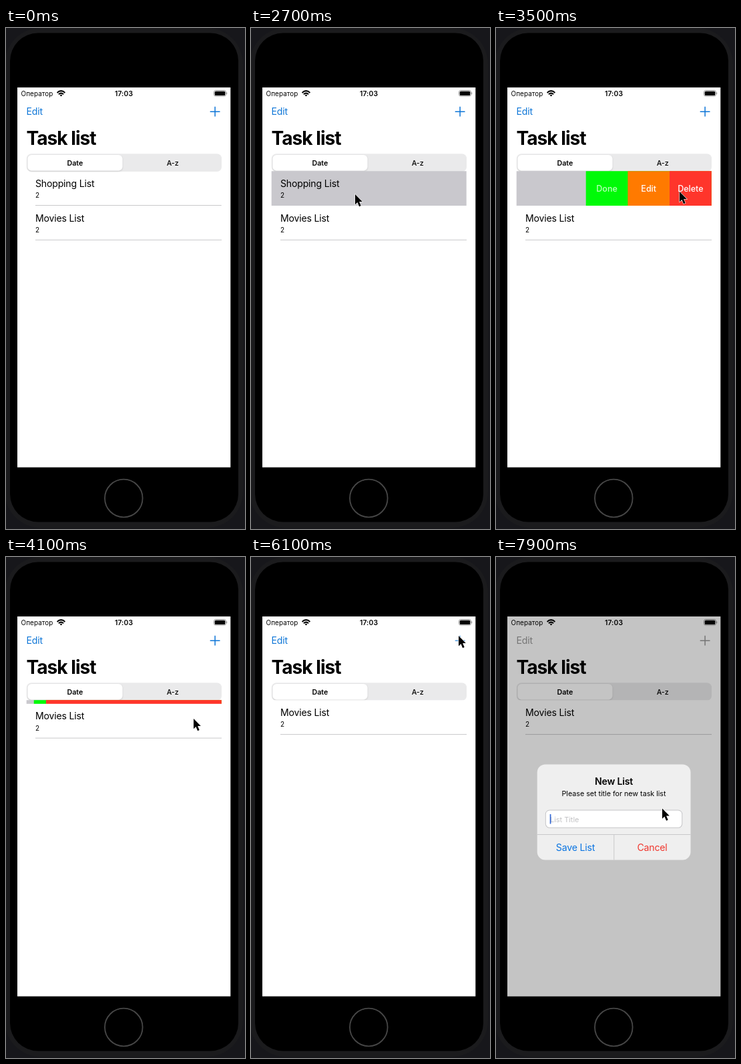
Recreate the animation shown at these times as an HTML page. Size 358 by 750 pixels, loop 8 s.

```html
<!DOCTYPE html>
<html lang="en">
<meta charset="utf-8">
<title>Task list</title>
<style>
  html, body { margin: 0; width: 100%; height: 100%; overflow: hidden; background: #17171b }
  svg { display: block; width: 358px; height: 750px; font-family: Inter, sans-serif }
  .mid { text-anchor: middle }
  .body { font-size: 14.1px; letter-spacing: -.014em }
  .note { font-size: 10px }
  .bar { font-size: 9.9px; letter-spacing: .01em }
  .bold { font-weight: 600 }
  .seg { font-size: 10.7px; font-weight: 600 }
  .act { font-size: 12.5px; font-weight: 500; fill: #fff }
  .line { stroke: #c8c8ca; stroke-width: 1 }
</style>
<svg viewBox="0 0 358 750">
  <defs>
    <clipPath id="rowClip"><rect x="30.7" y="214.3" width="292" height="51.7"/></clipPath>
    <filter id="soft" x="-10%" y="-30%" width="120%" height="170%">
      <feDropShadow dx="0" dy="1" stdDeviation="1.2" flood-opacity=".18"/>
    </filter>
  </defs>

  <!-- phone -->
  <rect x="-2" y="0" width="357" height="748" rx="54" fill="#1b1b1d"/>
  <rect x="6" y="7.5" width="342" height="732" rx="42"/>
  <circle cx="176.3" cy="704" r="28.3" fill="none" stroke="#474747" stroke-width="1.8"/>
  <rect x="17" y="89" width="319.3" height="568.7" fill="#fff"/>

  <!-- status bar -->
  <text class="bar" x="22.5" y="101.5">Оператор</text>
  <text class="bar bold mid" x="176.5" y="101.5" style="font-size:10.3px">17:03</text>
  <g fill="none" stroke="#000" stroke-width="2">
    <path d="M76.6 96.9Q82.5 91.4 88.4 96.9M78.9 99.3Q82.5 96 86.1 99.3"/>
    <path d="M82.5 102.6L80.6 100.6Q82.5 99 84.4 100.6Z" fill="#000" stroke="none"/>
  </g>
  <rect x="311.5" y="93.5" width="18" height="8.6" rx="2.6" fill="none" stroke="#999"/>
  <rect x="312.7" y="94.7" width="15.6" height="6.2" rx="1.5"/>
  <path d="M330.8 96.3v3" stroke="#999"/>

  <!-- header -->
  <text id="edit" class="body" x="30.5" y="130">Edit</text>
  <path id="plus" d="M305.7 125.2h14.8M313.1 117.8v14.8" stroke-width="1.5"/>
  <text x="30.5" y="175" style="font-size:28.2px;font-weight:700;letter-spacing:-.036em">Task list</text>
  <rect x="31" y="188.3" width="292" height="26.7" rx="7" fill="#eaeaeb"/>
  <rect x="32.4" y="190" width="142" height="23.6" rx="6" fill="#fff" filter="url(#soft)"/>
  <text class="seg mid" x="103.4" y="205.6">Date</text>
  <text class="seg mid" x="249.7" y="205.6" style="font-weight:500">A-z</text>

  <!-- first row with swipe actions -->
  <g id="row1" clip-path="url(#rowClip)">
    <rect id="lit" x="30" y="214" width="294" height="53" fill="#c9c8cd"/>
    <path id="rule" class="line" d="M44 265.5H323"/>
    <g id="content">
      <text class="body" x="44" y="238">Shopping List</text>
      <text class="note" x="44" y="254.3">2</text>
    </g>
    <g class="act mid" id="actions">
      <g><rect y="214" width="300" height="53" fill="#00fa08"/><text y="244.7" opacity=".75">Done</text></g>
      <g><rect y="214" width="300" height="53" fill="#ff7a00"/><text y="244.7">Edit</text></g>
      <g><rect y="214" width="300" height="53" fill="#ff352b"/><text y="244.7">Delete</text></g>
    </g>
  </g>

  <g id="row2">
    <rect x="30" y="266" width="294" height="53" fill="#fff"/>
    <text class="body" x="44" y="289.6">Movies List</text>
    <text class="note" x="44" y="306">2</text>
    <path class="line" d="M44 317.3H323"/>
  </g>

  <rect id="dim" x="17" y="89" width="319.3" height="568.7"/>

  <g id="alert">
    <rect x="61.7" y="310.5" width="229.8" height="143" rx="12" fill="#efefef"/>
    <text class="body bold mid" x="176.5" y="341.3">New List</text>
    <text class="mid" x="176.5" y="358.3" font-size="10.7">Please set title for new task list</text>
    <rect x="74.3" y="379" width="204.5" height="26.3" rx="6" fill="#fff" stroke="#c6c6c8" id="field"/>
    <text x="81" y="396.7" font-size="10.9" fill="#c2c2c4">List Title</text>
    <path class="line" d="M61.7 415.5H291.5M176.8 415.5V453.5"/>
    <text class="body mid" x="119" y="440" fill="#0a74e2">Save List</text>
    <text class="body mid" x="234" y="440" fill="#f0362d">Cancel</text>
    <rect id="caret" x="80.7" y="385" width="1.7" height="14.5" fill="#3569d6"/>
  </g>

  <path id="cursor" d="M0 0V15.2L3.4 12L6.1 18.2L8.7 17L6.1 11H10.8Z" stroke="#fff" stroke-width="1.1" paint-order="stroke"/>
</svg>
<script>
  const LOOP = 8000, STEP = 100, LEFT = 30.7, RIGHT = 322.7, ROW = 51.7;
  const $ = id => document.getElementById(id);
  const set = (el, attrs) => { for (const k in attrs) el.setAttribute(k, attrs[k]); };
  const show = (el, on) => set(el, { visibility: on ? 'visible' : 'hidden' });
  const clamp = v => Math.min(1, Math.max(0, v));
  const ease = v => v * v * (3 - 2 * v);
  const mix = (a, b, v) => a + (b - a) * v;

  // pointer stops: time, x, y
  const stops = [
    [100, 258, 296], [300, 115, 180], [500, 115, 180], [700, 82, 200], [1100, 243, 247],
    [1400, 243, 247], [1700, 252, 248], [1800, 252, 248], [2300, 156, 249], [2700, 156, 249],
    [3000, 50, 254], [3100, 50, 254], [3400, 275, 247], [3500, 275, 245], [3700, 281, 242],
    [4100, 281, 242], [4400, 283, 211], [5000, 309, 117], [5200, 309, 117], [5400, 311, 118],
    [7100, 311, 118], [7700, 247, 371], [7800, 247, 371], [7900, 249, 376.5]
  ];

  function pointer(t) {
    const i = stops.findIndex(s => s[0] > t);
    if (i < 0) return stops[stops.length - 1].slice(1);
    if (i === 0) return stops[0].slice(1);
    const a = stops[i - 1], b = stops[i], v = ease((t - a[0]) / (b[0] - a[0]));
    return [mix(a[1], b[1], v), mix(a[2], b[2], v)];
  }

  // critically damped spring, 0 to 1
  function spring(ms, rate) {
    const k = Math.max(0, ms) * rate;
    return 1 - (1 + k) * Math.exp(-k);
  }

  function drawRows(t) {
    const swipe = 188 * ease(clamp((t - 2700) / 400));
    const gone = t >= 4400 ? 1 : spring(t - 3800, .0127);
    const pressed = t >= 2300;
    show($('row1'), gone < 1);
    show($('lit'), pressed && gone < 1);
    show($('rule'), !pressed);
    set($('content'), { transform: `translate(${-swipe})` });
    show($('actions'), swipe > 0 && gone < 1);
    [...$('actions').children].forEach((action, i) => {
      const open = RIGHT - swipe * (3 - i) / 3;
      const x = LEFT + (open - LEFT) * (1 - gone) ** [1, .77, .92][i];
      const [box, label] = action.children;
      set(box, { x });
      set(label, { x: x + swipe / 6 });
    });
    set($('row2'), { transform: `translate(0 ${-ROW * gone})` });
  }

  function drawAlert(t) {
    const p = t > 6900 ? 1 - Math.exp((6900 - t) / 72) : 0;
    const tint = `rgb(${mix(14, 152, p)},${mix(118, 152, p)},${mix(215, 152, p)})`;
    set($('edit'), { fill: tint });
    set($('plus'), { stroke: tint, opacity: t >= 5400 && t < 7000 ? .7 : 1 });
    set($('dim'), { opacity: .23 * p });
    set($('alert'), {
      opacity: p,
      transform: `translate(176.5 382) scale(${1.2 - .2 * p}) translate(-176.5 -382)`
    });
    set($('field'), { 'fill-opacity': clamp(4 * p - 3) });
    show($('caret'), t >= 7400);
  }

  function frame(now) {
    const t = Math.floor(now % LOOP / STEP) * STEP;
    drawRows(t);
    drawAlert(t);
    show($('cursor'), t >= 100);
    set($('cursor'), { transform: `translate(${pointer(t)})` });
    requestAnimationFrame(frame);
  }
  frame(performance.now());
</script>
</html>
```
